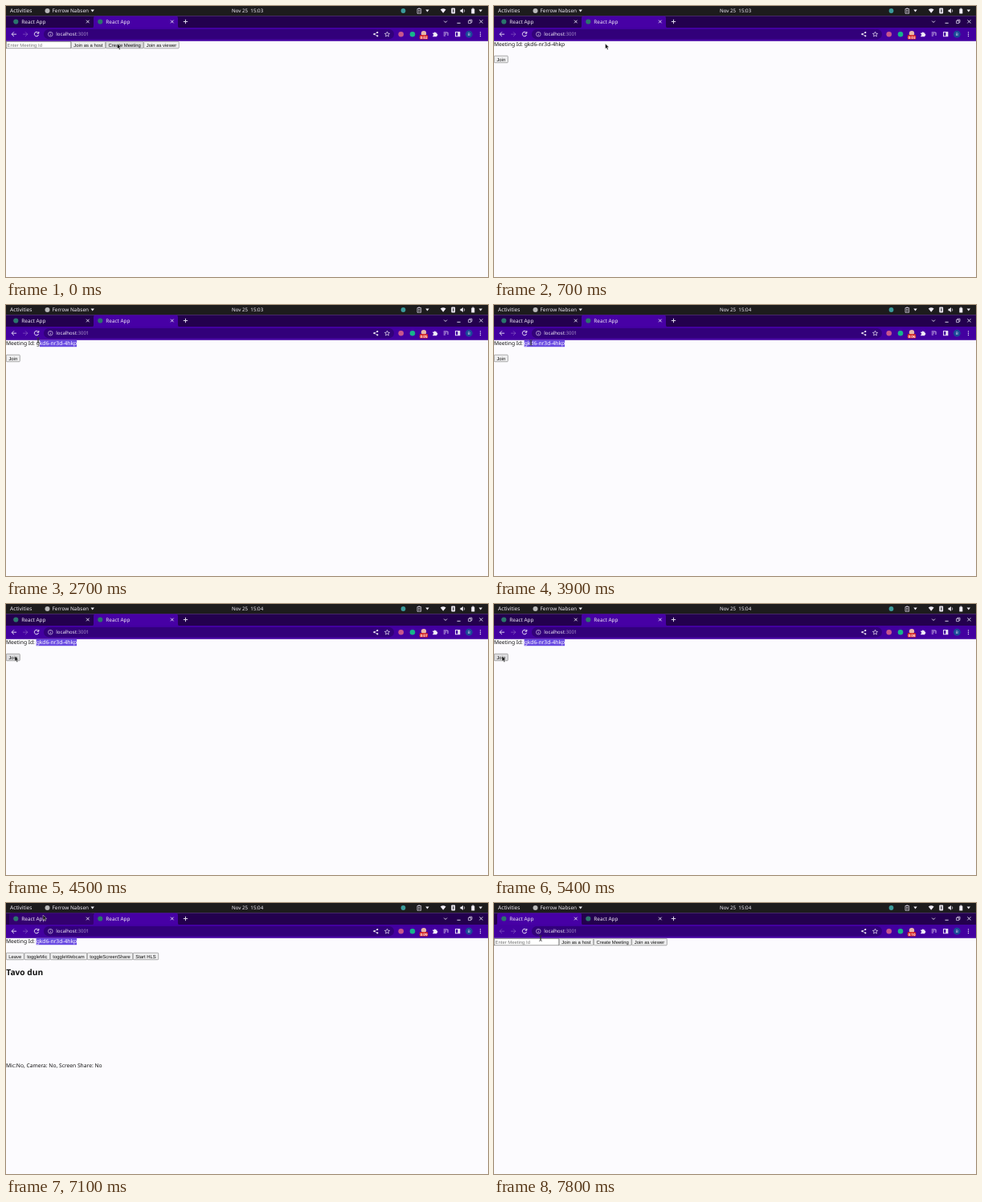
An HTML page for the animation above (8 s loop, 600 by 338 pixels).

```html
<!DOCTYPE html>
<html lang="en">
<head>
<meta charset="utf-8">
<title>Meeting demo</title>
<style>
  html, body { margin: 0; width: 100%; height: 100%; overflow: hidden; background: #fcfbfe; }
  svg { display: block; width: 100vw; height: 100vh; }
  text { font-family: "Noto Sans", sans-serif; text-rendering: geometricPrecision; white-space: pre; }
  .ui { fill: #f2eef8; }
  .line { fill: none; stroke: #eee8f8; stroke-width: .9; }
  .page { font-size: 6.7px; fill: #111; }
  .btn rect { fill: #efeff0; stroke: #777; stroke-width: .6; }
  .btn.hover rect { fill: #dedee0; }
  .btn text, .hint { font-family: "Liberation Sans", Arial, sans-serif; font-size: 5.92px; fill: #111; }
  .btn text { text-anchor: middle; }
  .hint { fill: #777; }
</style>
</head>
<body>
<svg viewBox="0 0 600 338">
  <rect width="600" height="338" fill="#fcfbfe"/>

  <!-- desktop bar -->
  <rect width="600" height="12.2" fill="#1d1c1d"/>
  <g class="ui">
    <text x="5" y="8.2" font-size="6.6">Activities</text>
    <text x="57.5" y="8.2" font-size="6.4">Ferrow Nabsen</text>
    <text id="clock" x="281" y="8.2" font-size="6.2"></text>
    <circle cx="51.5" cy="6" r="3" fill="#b9b9b9"/>
    <path d="M105.5 4.5h4.4l-2.2 3zM522.3 4.5h4.4l-2.2 3zM588.6 4.5h4.4l-2.2 3z"/>
    <circle cx="494.5" cy="6" r="2.9" fill="#3b9a9a"/>
    <path d="M540.8 4.4q3.4-2.4 6.8 0l-3.4 4.4z"/>
    <rect x="554.3" y="2.6" width="4.8" height="6.8" rx="1"/>
    <path d="M565.5 4.8h1.4l2-1.9v6.2l-2-1.9h-1.4z"/>
    <rect x="579.3" y="3.5" width="4" height="6" rx=".5"/>
    <rect x="580.4" y="2.6" width="1.8" height="1"/>
  </g>
  <g class="line">
    <path d="M512 3.5h4.6v5.8H512zM513.3 2.9h2M513 5.5h2.6M513 7.3h2.6" stroke-width=".7"/>
    <path d="M570.2 4.3q1.3 1.7 0 3.4" stroke-width=".7"/>
    <path d="M556 4.6l1.6 2.6-.9.9V3.8l.9.9L556 7.4" stroke="#1d1c1d" stroke-width=".5"/>
  </g>

  <!-- tab strip and toolbar -->
  <rect y="12.2" width="600" height="15" fill="#23004e"/>
  <path id="hoverTab" d="M4 27V15q0-2.4 2.4-2.4h100.2q2.4 0 2.4 2.4v12z" fill="#33006f"/>
  <path id="tab" d="M2 27.2q2 0 2-2V15q0-2.4 2.4-2.4h100.2q2.4 0 2.4 2.4v10.2q0 2 2 2z" fill="#4700a5"/>
  <rect y="27" width="600" height="16.6" fill="#4300a0"/>
  <rect y="42.8" width="600" height=".9" fill="#5b22ae"/>
  <rect x="47" y="29" width="436" height="12.4" rx="6.2" fill="#32007a"/>
  <g id="tabs"></g>
  <g class="line">
    <path d="M223.5 16.8v5.4M220.8 19.5h5.4M545.2 18.6l1.9 1.9 1.9-1.9M561.5 21.3h4.2M589.4 17.4l4 4M593.4 17.4l-4 4"/>
    <path d="M575.6 18.4h3.2v3.2h-3.2zM576.8 18.2v-1h3.2v3.2h-1" stroke-width=".7"/>
    <path id="back" d="M13 35.2H7.2M9.9 32.4l-2.8 2.8 2.8 2.8"/>
    <path d="M21 35.2h5.8M24 32.4l2.8 2.8-2.8 2.8" opacity=".3"/>
    <path d="M40.3 33.6a2.7 2.7 0 1 0 .3 2.3M40.8 32v2.2h-2.3" stroke-width="1"/>
    <circle cx="55.3" cy="35.2" r="2.8" stroke-width=".6"/>
    <path d="M55.3 34.8v2M55.3 33.3v.7" stroke-width=".7"/>
    <path d="M462.2 33.1l-3.8 2.1 3.8 2.1" stroke-width=".6"/>
    <path d="M474.5 32.2l.9 2 2.2.2-1.7 1.4.5 2.2-1.9-1.2-1.9 1.2.5-2.2-1.7-1.4 2.2-.2z" stroke-width=".7"/>
    <path d="M544.7 33h5M544.7 35h3.4M544.7 37h2.4M550 33v4" stroke-width=".8"/>
    <rect x="559.5" y="32.6" width="5.4" height="5.2"/>
  </g>
  <g class="ui">
    <text x="62.3" y="37.4" font-size="6.05">localhost<tspan fill="#a993cc">:3001</tspan></text>
    <circle cx="462.3" cy="33.1" r="1.1"/><circle cx="458.4" cy="35.2" r="1.1"/><circle cx="462.3" cy="37.3" r="1.1"/>
    <circle cx="491.7" cy="35.2" r="3.3" fill="#c9578c"/>
    <circle cx="506" cy="35.2" r="3.3" fill="#16b58b"/>
    <circle cx="520" cy="34.2" r="3.2" fill="#e7b7a9"/>
    <rect x="514.8" y="36.3" width="10.4" height="5.2" rx=".8" fill="#d51c1c"/>
    <text id="badge" x="520" y="40.6" font-size="4.6" font-weight="700" text-anchor="middle" fill="#fff"></text>
    <path d="M531.3 33.4h1.6a1 1 0 0 1 2 0h1.5v1.5a1 1 0 0 1 0 2v1.4h-5.1v-1.4a1 1 0 0 0 0-2z"/>
    <path d="M562.4 32.6h2.5v5.2h-2.5z"/>
    <circle cx="576.3" cy="35.2" r="4.4" fill="#1a4b98"/>
    <text x="576.3" y="37" font-size="4.8" text-anchor="middle">B</text>
    <circle cx="590.5" cy="32.9" r=".7"/><circle cx="590.5" cy="35.2" r=".7"/><circle cx="590.5" cy="37.5" r=".7"/>
  </g>

  <!-- pages -->
  <g id="home">
    <rect x=".4" y="44.4" width="80.4" height="8.4" fill="#fff" stroke="#777" stroke-width=".7"/>
    <text class="hint" x="1.6" y="50.7">Enter Meeting Id</text>
  </g>
  <g id="meeting">
    <rect id="mark" y="43.9" height="8.3" fill="#6a4be2"/>
    <text class="page" x="0" y="50.4">Meeting Id: <tspan id="plain"></tspan><tspan id="picked" fill="#fff"></tspan></text>
    <g id="lobby"></g>
    <g id="room">
      <text x=".3" y="89.6" font-size="10.2" font-weight="700" fill="#111">Tavo dun</text>
      <text class="page" x="0" y="205">Mic:No, Camera: No, Screen Share: No</text>
    </g>
  </g>

  <g id="pointer">
    <path id="arrow" d="M0 0v6.4l1.5-1.3 1 2.3 1.2-.5-1-2.3h2z" fill="#111" stroke="#fff" stroke-width=".4"/>
    <path id="beam" d="M-1.8-3.3q1.8 0 1.8.9v4.8q0 .9-1.8.9M1.8-3.3Q0-3.3 0-2.4v4.8q0 .9 1.8.9" fill="none" stroke="#333" stroke-width=".8"/>
  </g>
</svg>
<script>
const $ = id => document.getElementById(id);
const show = (id, on) => $(id).setAttribute('visibility', on ? 'inherit' : 'hidden');

function add(parent, tag, attrs, text = '') {
  const el = document.createElementNS('http://www.w3.org/2000/svg', tag);
  for (const k in attrs) el.setAttribute(k, attrs[k]);
  el.textContent = text;
  return parent.appendChild(el);
}

function button(parent, label, x0, x1, y) {
  const g = add($(parent), 'g', { class: 'btn' });
  add(g, 'rect', { x: x0 + .3, y: y + .3, width: x1 - x0 - .6, height: 8.5, rx: .9 });
  add(g, 'text', { x: (x0 + x1) / 2, y: y + 6.6 }, label);
  return g;
}

function row(parent, y, x, items) {
  return items.map(([label, end]) => {
    const g = button(parent, label, x, end, y);
    x = end;
    return g;
  });
}

const [, create] = row('home', 44, 81, [['Join as a host', 124], ['Create Meeting', 171.3], ['Join as viewer', 215.6]]);
const [join] = row('lobby', 61.9, 0, [['Join', 17.6]]);
row('room', 61.9, 0, [['Leave', 22.6], ['toggleMic', 55], ['toggleWebcam', 101], ['toggleScreenShare', 158], ['Start HLS', 190]]);

for (const x of [0, 105]) {
  add($('tabs'), 'circle', { cx: x + 12.3, cy: 19.5, r: 3.1, fill: '#2b756c' });
  add($('tabs'), 'text', { x: x + 19.3, y: 21.7, 'font-size': 6.4, class: 'ui' }, 'React App');
  add($('tabs'), 'path', { d: `M${x + 100} 17.7l3.6 3.6m0-3.6l-3.6 3.6`, class: 'line' });
}

const LOOP = 8000, CREATE = 700, JOINED = 5700, SWITCH = 7200;
const MEETING_ID = 'gkd6-nr3d-4hkp';

// time, x, y
const path = [
  [0, 138.5, 47], [1000, 138.5, 47], [1600, 89, 48], [2000, 89, 48], [2700, 40, 44],
  [2800, 39, 45], [3000, 46, 47], [3900, 46, 47], [4400, 11, 65], [4700, 11, 65],
  [4800, 10, 65], [6000, 10, 65], [6500, 46, 15], [7200, 46, 15], [7700, 58, 44]
];

function pointerAt(t) {
  const i = path.findIndex(p => p[0] > t);
  if (i < 0) return path[path.length - 1].slice(1);
  const [t0, x0, y0] = path[i - 1], [t1, x1, y1] = path[i];
  const u = (t - t0) / (t1 - t0), k = u * u * (3 - 2 * u);
  return [x0 + (x1 - x0) * k, y0 + (y1 - y0) * k];
}

function selectId(t, x) {
  const n = MEETING_ID.length;
  const start = t < 2000 ? n : t >= 2800 ? 0 : Math.min(n, Math.max(1, Math.round((x - 37.7) / 50.5 * n)));
  $('plain').textContent = MEETING_ID.slice(0, start);
  $('picked').textContent = MEETING_ID.slice(start);
  const left = start < n ? $('picked').getStartPositionOfChar(0).x : 0;
  const right = start < n ? $('picked').getEndPositionOfChar(n - start - 1).x : 0;
  $('mark').setAttribute('x', left);
  $('mark').setAttribute('width', right - left);
}

function draw(now) {
  const t = Math.floor(now % LOOP / 100) * 100;
  const [x, y] = pointerAt(t);
  const first = t >= SWITCH, home = t < CREATE || first;

  show('home', home);
  show('meeting', !home);
  show('lobby', !home && t < JOINED);
  show('room', !home && t >= JOINED);
  if (!home) selectId(t, x);

  $('tab').setAttribute('transform', `translate(${first ? 0 : 105})`);
  show('hoverTab', !first && y < 27 && x < 109);
  $('back').setAttribute('opacity', first ? .3 : 1);
  create.classList.toggle('hover', t < CREATE);
  join.classList.toggle('hover', x < 17.6 && y > 61);

  $('clock').textContent = `Nov 25  15:0${t < 3300 ? 3 : 4}`;
  $('badge').textContent = '0:' + String(2 + Math.floor((t + 700) / 1000)).padStart(2, '0');

  const beam = first ? y > 40 : t >= 1400 && t < 4100;
  show('beam', beam);
  show('arrow', !beam);
  $('pointer').setAttribute('transform', `translate(${x} ${y})`);
}

const begin = performance.now();
function tick() {
  draw(performance.now() - begin);
  requestAnimationFrame(tick);
}
tick();
</script>
</body>
</html>
```
